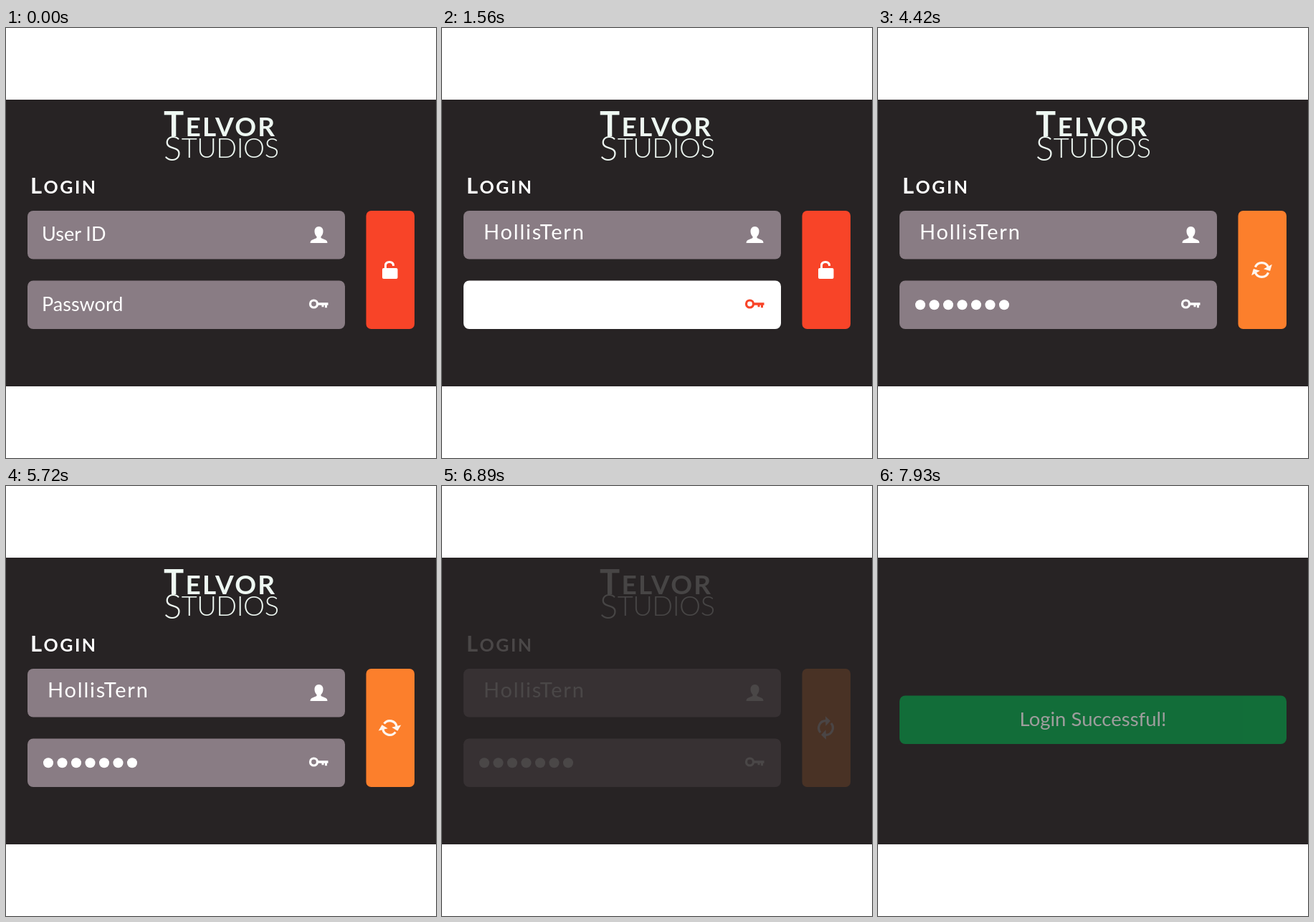
Write an HTML page that moves like this. It is 600 px wide and 600 px high and loops after 8000 ms.

```html
<!DOCTYPE html>
<html lang="en">
<head>
<meta charset="utf-8">
<title>Login form</title>
<style>
  html, body { margin: 0; width: 100%; height: 100%; overflow: hidden; background: #fff; }
  svg { display: block; width: 100vw; height: 100vh; }
  text { font: 27px Lato, sans-serif; fill: #fff; }
  #brand text { fill: #eef8f2; }
  #brand .bold { font-size: 37px; font-weight: 700; letter-spacing: 2.2px; }
  #brand .thin { font-size: 38px; font-weight: 300; letter-spacing: -.5px; }
  #brand .cap { font-size: 47px; }
  .title { font-size: 25px; font-weight: 700; letter-spacing: 2.5px; }
  .title tspan { font-size: 31px; }
  .field { color: #fff; }
  .field .box { fill: #897c84; }
  .field text { fill: currentColor; }
  .field.focus { color: #f84428; }
  .field.focus .box { fill: #fff; }
  #name { font-size: 29px; letter-spacing: 1.8px; }
  .done { font-size: 27.5px; text-anchor: middle; }
</style>
</head>
<body>
<svg viewBox="0 0 600 600">
  <rect y="100" width="600" height="400" fill="#272324"/>
  <g id="form">
    <g id="brand">
      <text class="bold" x="220" y="151"><tspan class="cap">T</tspan>ELVOR</text>
      <text class="thin" x="220" y="185"><tspan class="cap">S</tspan><tspan dy="-4">TUDIOS</tspan></text>
    </g>
    <text class="title" x="34" y="230.500"><tspan>L</tspan>OGIN</text>

    <g class="field" id="user">
      <rect class="box" x="30" y="255" width="443" height="67.500" rx="8"/>
      <text class="hint" x="50" y="297">User ID</text>
      <text id="name" x="58" y="295"></text>
      <path fill="currentColor" d="M436.500 277c4 0 6 3 6 6.500 0 3-1 5.500-3 7.500v2l7 3q2 1 2 4h-24q0-3 2-4l7-3v-2c-2-2-3-4.500-3-7.500 0-3.500 2-6.500 6-6.500z"/>
    </g>

    <g class="field" id="pass">
      <rect class="box" x="30" y="352.500" width="443" height="67.500" rx="8"/>
      <text class="hint" x="50" y="395">Password</text>
      <g id="dots" fill="currentColor"></g>
      <circle cx="429.500" cy="385" r="5" fill="none" stroke="currentColor" stroke-width="3.200"/>
      <path fill="currentColor" d="M435 383.300h14.500v3.500h-1.500v3.500h-3v-3.500h-1.500v2.500h-3v-2.500h-5.500z"/>
    </g>

    <rect id="button" x="502.500" y="255" width="67.500" height="165" rx="7"/>
    <g id="lock">
      <rect x="525" y="335" width="21.500" height="15" rx="2" fill="#fff"/>
      <path d="M529.500 336v-4.500q0-5 5.500-5t5.500 5v.5" fill="none" stroke="#fff" stroke-width="3"/>
    </g>
    <g id="spin">
      <g id="arrow">
        <path d="M-9.800-1A9.800 9.800 0 0 1 7.500-6.300" fill="none" stroke="#fff" stroke-width="3.200"/>
        <path d="M11.500-11.500v9.500h-9.500z" fill="#fff"/>
      </g>
      <use href="#arrow" transform="rotate(180)"/>
    </g>
  </g>
  <g id="success">
    <rect x="30" y="292.500" width="540" height="67.500" rx="8" fill="#02aa4a"/>
    <text class="done" x="300" y="335">Login Successful!</text>
  </g>
</svg>
<script>
  const LOOP = 8000, STEP = 130, NAME = "HollisTern", DOTS = 7;
  const FOCUS_USER = 1, FOCUS_PASS = 12, BLUR = 20, BUSY = 21;   // in steps
  const $ = id => document.getElementById(id);
  const clamp = (v, lo = 0, hi = 1) => Math.min(hi, Math.max(lo, v));
  const show = (el, on) => el.setAttribute("opacity", +on);

  $("dots").innerHTML = Array.from({ length: DOTS }, (_, i) =>
    `<circle cx="${59 + 19.5 * i}" cy="386.300" r="7"/>`).join("");
  const dots = [...$("dots").children];

  function field(id, step, from, to) {
    $(id).classList.toggle("focus", step >= from && step < to);
    show($(id).querySelector(".hint"), step < from);
  }

  function draw(now) {
    const step = Math.floor(now % LOOP / STEP), t = step * STEP;
    field("user", step, FOCUS_USER, FOCUS_PASS);
    field("pass", step, FOCUS_PASS, BLUR);
    $("name").textContent = NAME.slice(0, clamp(step - FOCUS_USER, 0, NAME.length));
    dots.forEach((dot, i) => show(dot, step > FOCUS_PASS + i));

    const busy = step >= BUSY;
    $("button").setAttribute("fill", busy ? "#fc7f2c" : "#f84428");
    show($("lock"), !busy);
    show($("spin"), busy ? clamp(.5 + (step - BUSY) * .2, 0, .92) : 0);
    $("spin").setAttribute("transform", `translate(535.500 337.500) rotate(${(step - 22) * 91.4})`);

    show($("form"), clamp(1 - (t - 6000) / 1060));
    show($("success"), clamp((t - 7350) / 1050));
    requestAnimationFrame(draw);
  }
  draw(0);
</script>
</body>
</html>
```
